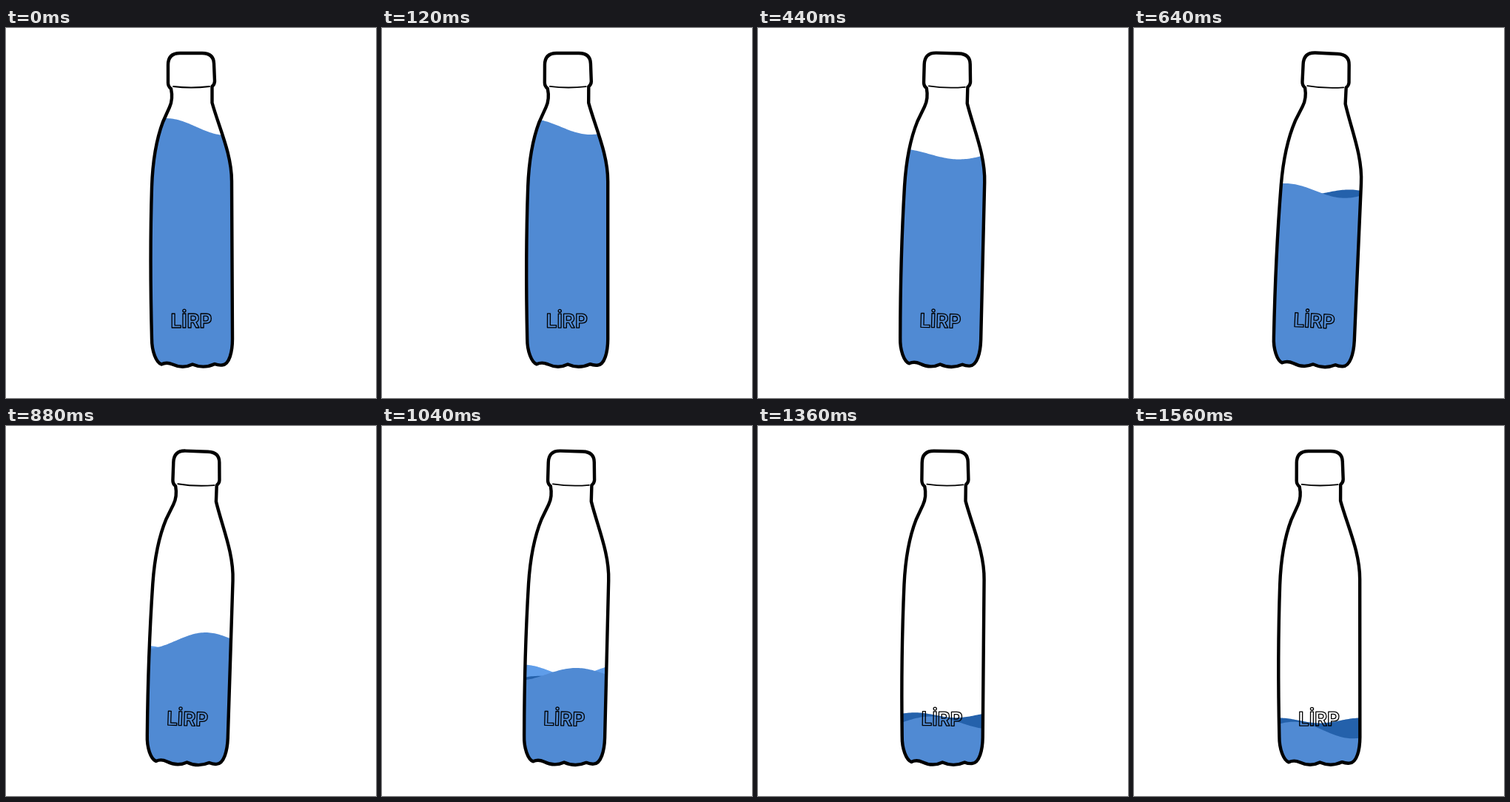
Write an HTML page with a canvas that moves like this. It is 500 px wide and 500 px high and loops after 1.6 s.

```html
<!DOCTYPE html>
<html lang="en">
<head>
<meta charset="utf-8">
<title>Water bottle</title>
<style>
  html, body { margin: 0; width: 100%; height: 100%; overflow: hidden; background: #fff; }
  canvas { display: block; width: 500px; height: 500px; }
</style>
</head>
<body>
<canvas id="stage" width="500" height="500"></canvas>
<script>
const ctx = document.getElementById('stage').getContext('2d');
const LOOP = 1600, STEP = 40, TURN = 640;
const MAX_TILT = 2.75 * Math.PI / 180;

const bottle = new Path2D(`M219 74 V50 Q219 34 235 34 H265 Q280.5 34 281 48 L282 72
  Q282 76 278.5 79 V101 C288 135 305 170 305 207 L306 420
  C306 437 302 455 292 455.5 Q287 456 282 454 Q267 461 252 454.5 Q239 461 225 454.5
  Q217 451 210 454.5 C203 452 197 437 197 420 C195 345 195 280 197 215
  C198 185 203 151 212 127 L221 107 Q226 96 223 82 Q219 79 219 74 Z`);
const capLine = new Path2D('M226 79 Q250 82 275 79');

const mix = (a, b, p) => a + (b - a) * p;
const smooth = p => p * p * (3 - 2 * p);
const clamp = p => Math.min(1, Math.max(0, p));

// Gap below the front wave: smallest at the peak time, then sinking out of view.
const gap = (t, peak, least, width) => least + ((t - peak) / width) ** 2;

const tilt = t => MAX_TILT * (t < TURN ? (t / TURN) ** 1.4 : 1 - (t - TURN) / 1000);
const waterLevel = t => mix(133.5, 411, smooth(clamp((t - 120) / 1400)));

// The front wave sloshes left, then right, then settles back.
const slosh = [[0, 297], [280, 261], [TURN, 285], [900, 355], [LOOP, 292]];
function sloshAt(t) {
  const i = slosh.findIndex(([time]) => time > t);
  const [t0, x0] = slosh[i - 1], [t1, x1] = slosh[i];
  return mix(x0, x1, (t - t0) / (t1 - t0));
}

function drawWave(color, level, height, length, trough) {
  ctx.beginPath();
  ctx.moveTo(170, 480);
  for (let x = 170; x <= 330; x += 2) {
    ctx.lineTo(x, level + height * Math.cos((x - trough) / length * 2 * Math.PI));
  }
  ctx.lineTo(330, 480);
  ctx.fillStyle = color;
  ctx.fill();
}

function drawWater(t) {
  const level = waterLevel(t);
  const darkGap = Math.min(gap(t, TURN, 2, 62), gap(t, 1560, -13, 120));
  const swell = 9.2 + 2.2 * Math.cos(4 * Math.PI * t / LOOP);
  drawWave('#5f9de9', level + gap(t, 1200, -12, 62), 7.5, 130, 257);
  drawWave('#2461ab', level + darkGap, 3.5, 110, 280 - Math.abs(t - 1200) * .08);
  drawWave('#508ad3', level, swell, 160, sloshAt(t));
}

function tiltStage(angle) {
  ctx.translate(250, 250);
  ctx.rotate(angle);
  ctx.translate(-250, -250);
}

function draw(t) {
  ctx.fillStyle = '#fff';
  ctx.fillRect(0, 0, 500, 500);

  ctx.save();
  tiltStage(tilt(t));
  ctx.clip(bottle);
  ctx.resetTransform();
  drawWater(t);
  ctx.restore();

  ctx.save();
  tiltStage(tilt(t));
  ctx.strokeStyle = '#000';
  ctx.lineJoin = ctx.lineCap = 'round';
  ctx.lineWidth = 4.4;
  ctx.stroke(bottle);
  ctx.lineWidth = 1.8;
  ctx.stroke(capLine);
  ctx.font = '700 26px Inter, sans-serif';
  ctx.textAlign = 'center';
  ctx.lineWidth = 1.3;
  ctx.strokeText('LİRP', 250.5, 405);
  ctx.restore();
}

const start = performance.now();
function tick() {
  const t = Math.max(0, performance.now() - start) % LOOP;
  draw(Math.floor(t / STEP) * STEP);
  requestAnimationFrame(tick);
}
tick();
</script>
</body>
</html>
```
